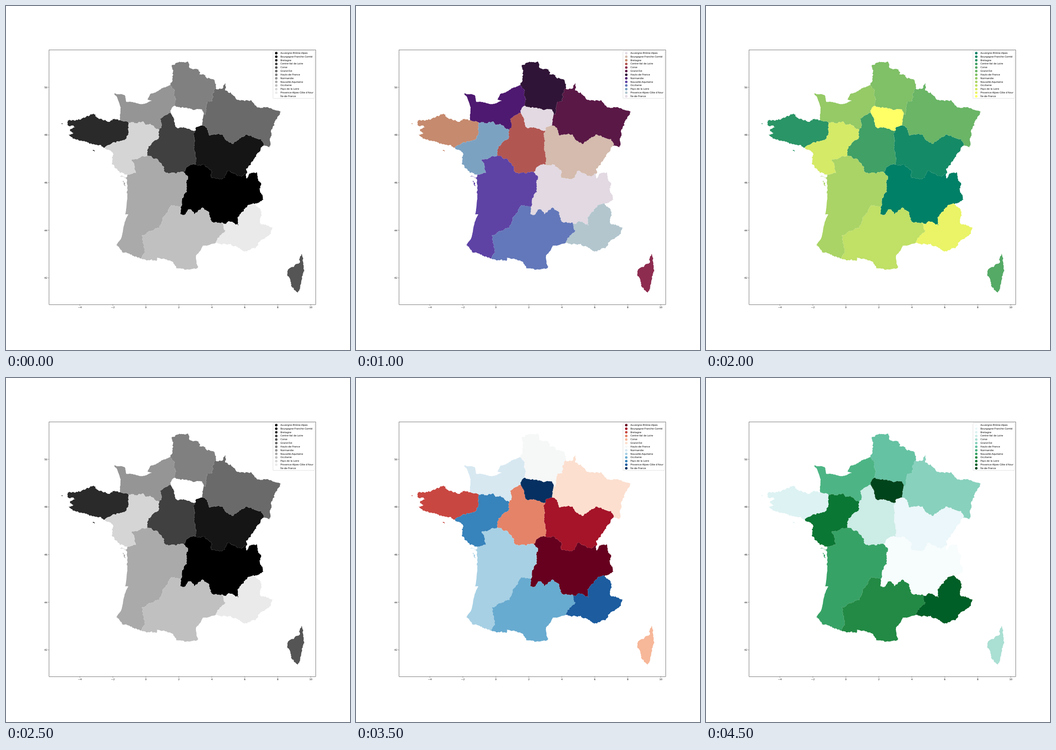
Recreate the animation shown at these times as an HTML page. Size 748x748 px, loop 5 s.

```html
<!DOCTYPE html>
<html lang="fr">
<head>
<meta charset="utf-8">
<title>Régions</title>
<style>
html, body { margin: 0; width: 100%; height: 100%; overflow: hidden; background: #fff; }
svg { display: block; width: 100vw; height: 100vh; }
text { font: 5.19px "DejaVu Sans", sans-serif; text-rendering: geometricPrecision; }
</style>
</head>
<body>
<svg id="stage" viewBox="0 0 748 748"></svg>
<script>
const STEP = 500;
const regions = {
  ara: 'Auvergne-Rhône-Alpes', bfc: 'Bourgogne-Franche-Comté', bre: 'Bretagne',
  cvl: 'Centre-Val de Loire', cor: 'Corse', ges: 'Grand Est', hdf: 'Hauts-de-France',
  nor: 'Normandie', naq: 'Nouvelle-Aquitaine', occ: 'Occitanie', pdl: 'Pays de la Loire',
  pac: "Provence-Alpes-Côte d'Azur", idf: 'Île-de-France'
};

// Places where borders meet
const junctions = {
  A: '357,172', B: '366,217', C: '358,232', D: '333,270', E: '266,253', F: '248,248',
  G: '215,308', H: '430,234', I: '456,179', J: '425,260', K: '412,271', L: '559,304',
  M: '412,345', N: '387,362', O: '307,325', P: '264,367', Q: '380,437', R: '471,471',
  S: '456,515', T: '541,430', U: '522,365', V: '293,549', W: '264,408', X: '240,520',
  Y: '414,560', Z: '642,539'
};

// The regions on either side, a few key points, and how ragged the line is
const borders = [
  ['hdf', 'A 361,165 361,128 373,123 396,121 400,135 418,138 421,149 434,150 438,158 454,161 I'],
  ['hdf ges', 'I 449,191 449,206 438,208 434,236 H'],
  ['hdf idf', 'H 426,225 400,223 B'],
  ['hdf nor', 'A 366,182 B'],
  ['nor', 'A 314,191 308,204 317,206 298,213 261,208 258,194 235,190 247,214 248,240 F', .12],
  ['nor bre', 'F E'],
  ['nor pdl', 'E 283,255 298,251 303,258 313,256 D'],
  ['nor cvl', 'D 338,264 335,245 C'],
  ['nor idf', 'B 357,228 C'],
  ['idf cvl', 'C 371,264 391,265 K'],
  ['idf bfc', 'K 414,263 J'],
  ['idf ges', 'J 428,250 H'],
  ['ges', 'I 471,180 477,168 477,184 489,188 500,202 532,205 545,219 572,222 598,230 580,264 573,307 L'],
  ['ges bfc', 'J 433,262 443,282 470,279 483,294 494,300 520,281 555,290 L'],
  ['cvl bfc', 'K 408,280 409,312 M'],
  ['bfc', 'L 550,318 522,354 U'],
  ['bfc ara', 'M 431,345 446,357 446,373 474,374 482,359 505,369 U'],
  ['ara', 'U 524,375 530,364 546,362 547,375 555,388 551,398 560,421 T'],
  ['ara pac', 'T 530,432 503,460 506,477 484,468 479,474 R'],
  ['ara occ', 'Q 380,453 390,453 399,442 409,453 427,438 439,446 449,470 R'],
  ['ara naq', 'N 396,372 393,405 383,420 Q'],
  ['ara cvl', 'N 398,347 M'],
  ['cvl naq', 'O 330,334 349,363 N'],
  ['cvl pdl', 'D 331,289 310,305 O'],
  ['pdl naq', 'O 274,333 283,363 P'],
  ['bre pdl', 'E 266,277 258,292 231,298 G'],
  ['bre', 'F 236,245 224,252 203,246 194,236 172,243 135,249 134,259 150,264 139,269 148,277 135,279 145,288 190,300 G', .35],
  ['pdl', 'G 232,318 230,342 248,363 P'],
  ['naq', 'P 261,375 264,394 W'],
  ['naq', 'W 259,453 266,453 258,470 250,506 X', .04],
  ['naq', 'X 253,535 V'],
  ['naq occ', 'V 302,528 295,499 333,483 341,463 360,433 Q'],
  ['occ', 'V 328,554 329,547 362,556 370,569 393,573 417,569 Y'],
  ['occ', 'Y 413,543 428,521 S', .08],
  ['occ pac', 'R 477,488 464,502 S'],
  ['pac', 'S 488,517 518,534 543,526 553,511 575,496 580,482 554,474 556,448 T'],
  ['cor', 'Z 647,570 642,603 634,623 620,609 612,580 613,573 639,555 Z'],
  // Islands
  ['bre', '120,256 123,257 123,255 120,256'],
  ['bre', '187,313 193,317 193,315 187,313'],
  ['naq', '248,370 259,375 260,373 248,370'],
  ['naq', '254,380 260,392 258,384 254,380']
];

let seed = 7;
const random = () => (seed = seed * 16807 % 2147483647) / 2147483647;

// Midpoint displacement between p and q; returns the points after p.
function ragged(p, q, amount) {
  const dx = q[0] - p[0], dy = q[1] - p[1], length = Math.hypot(dx, dy);
  if (length < 2.2) return [q];
  const shift = (random() - .5) * 2 * Math.min(amount, 1.8 / length);
  const mid = [(p[0] + q[0]) / 2 - dy * shift, (p[1] + q[1]) / 2 + dx * shift];
  return [...ragged(p, mid, amount), ...ragged(mid, q, amount)];
}

const lines = borders.map(([owners, text, amount = .26]) => {
  const points = text.split(' ').map(token => (junctions[token] ?? token).split(',').map(Number));
  return { owners, points: points.flatMap((p, i) => i ? ragged(points[i - 1], p, amount) : [p]) };
});

// Joins all lines of a region end to end into closed rings.
function outline(code) {
  const same = (a, b) => a[0] === b[0] && a[1] === b[1];
  const open = lines.filter(line => line.owners.includes(code)).map(line => line.points);
  let path = '';
  while (open.length) {
    const ring = [...open.shift()];
    while (!same(ring[0], ring.at(-1))) {
      const end = ring.at(-1);
      const i = open.findIndex(points => same(points[0], end) || same(points.at(-1), end));
      const [next] = open.splice(i, 1);
      ring.push(...(same(next[0], end) ? next : [...next].reverse()).slice(1));
    }
    path += 'M' + ring.map(p => p.map(v => v.toFixed(1)).join()).join(' ') + 'Z';
  }
  return path;
}

// Colour maps: position 0..1 to [r, g, b] in 0..1
const ramp = text => {
  const stops = text.split(' ').map(hex => [0, 2, 4].map(i => parseInt(hex.slice(i, i + 2), 16) / 255));
  return x => {
    const at = x * (stops.length - 1), i = Math.min(Math.floor(at), stops.length - 2);
    return stops[i].map((v, c) => v + (stops[i + 1][c] - v) * (at - i));
  };
};
const wave = (x, shift) => Math.sin((x * 31.5 + shift) * Math.PI);
const gray = x => [x, x, x];
const flag = x => [.75 * wave(x, .25) + .5, wave(x, 0), .75 * wave(x, -.25) + .5];
const spring = x => [1, x, 1 - x];
const summer = x => [x, .5 + x / 2, .4];
const twilight = ramp('e2d9e2 d4bbac c6896c b25652 8e2c50 591846 2f1436 4e186f 5e43a5 6276ba 7ba1c2 b2c6ce e2d9e2');
const viridis = ramp('440154 3b528b 21918c 5ec962 fde725');
const redBlue = ramp('67001f b2182b d6604d f4a582 fddbc7 f7f7f7 d1e5f0 92c5de 4393c3 2166ac 053061');
const yellowRed = ramp('ffffcc fed976 fd8d3c e31a1c 800026');
const blueGreen = ramp('f7fcfd e5f5f9 ccece6 99d8c9 66c2a4 41ae76 238b45 006d2c 00441b');
const maps = [gray, flag, twilight, spring, summer, gray, viridis, redBlue, yellowRed, blueGreen];

const stage = document.getElementById('stage');
function add(name, attributes, content = '') {
  const node = document.createElementNS('http://www.w3.org/2000/svg', name);
  for (const key in attributes) node.setAttribute(key, attributes[key]);
  node.textContent = content;
  return stage.appendChild(node);
}

const shapes = Object.keys(regions).map(code => add('path', { d: outline(code) }));

const axis = { fill: 'none', stroke: '#000', 'stroke-width': .52 };
add('rect', { x: 93.76, y: 95.7, width: 579.6, height: 553.6, ...axis });
for (let lon = -4; lon <= 10; lon += 2) {
  const x = 304.1 + 35.86 * lon;
  add('path', { d: `M${x} 649.5v1.8`, ...axis });
  add('text', { x, y: 657, 'text-anchor': 'middle' }, String(lon).replace('-', '−'));
}
for (let lat = 42; lat <= 50; lat += 2) {
  const y = 591.2 - 51.8 * (lat - 42);
  add('path', { d: `M93.5 ${y}h-1.8`, ...axis });
  add('text', { x: 90, y: y + 2, 'text-anchor': 'end' }, lat);
}

add('rect', { x: 580.5, y: 97.5, width: 90.5, height: 103.5, rx: 1, fill: '#fff', stroke: '#ccc', 'stroke-width': .6 });
const dots = Object.values(regions).map((name, i) => {
  const y = 102.4 + 7.83 * i;
  add('text', { x: 596.8, y: y + 1.6 }, name);
  return add('circle', { cx: 587.7, cy: y, r: 2.75 });
});

let shown = -1;
function draw(now) {
  const index = Math.floor(now / STEP) % maps.length;
  if (index !== shown) {
    shown = index;
    shapes.forEach((shape, i) => {
      const x = Math.min(255, Math.floor(i * 256 / 12)) / 255;
      const rgb = maps[index](x).map(v => Math.round(255 * Math.min(1, Math.max(0, v))));
      for (const node of [shape, dots[i]]) node.setAttribute('fill', `rgb(${rgb})`);
    });
  }
  requestAnimationFrame(draw);
}
draw(performance.now());
</script>
</body>
</html>
```
